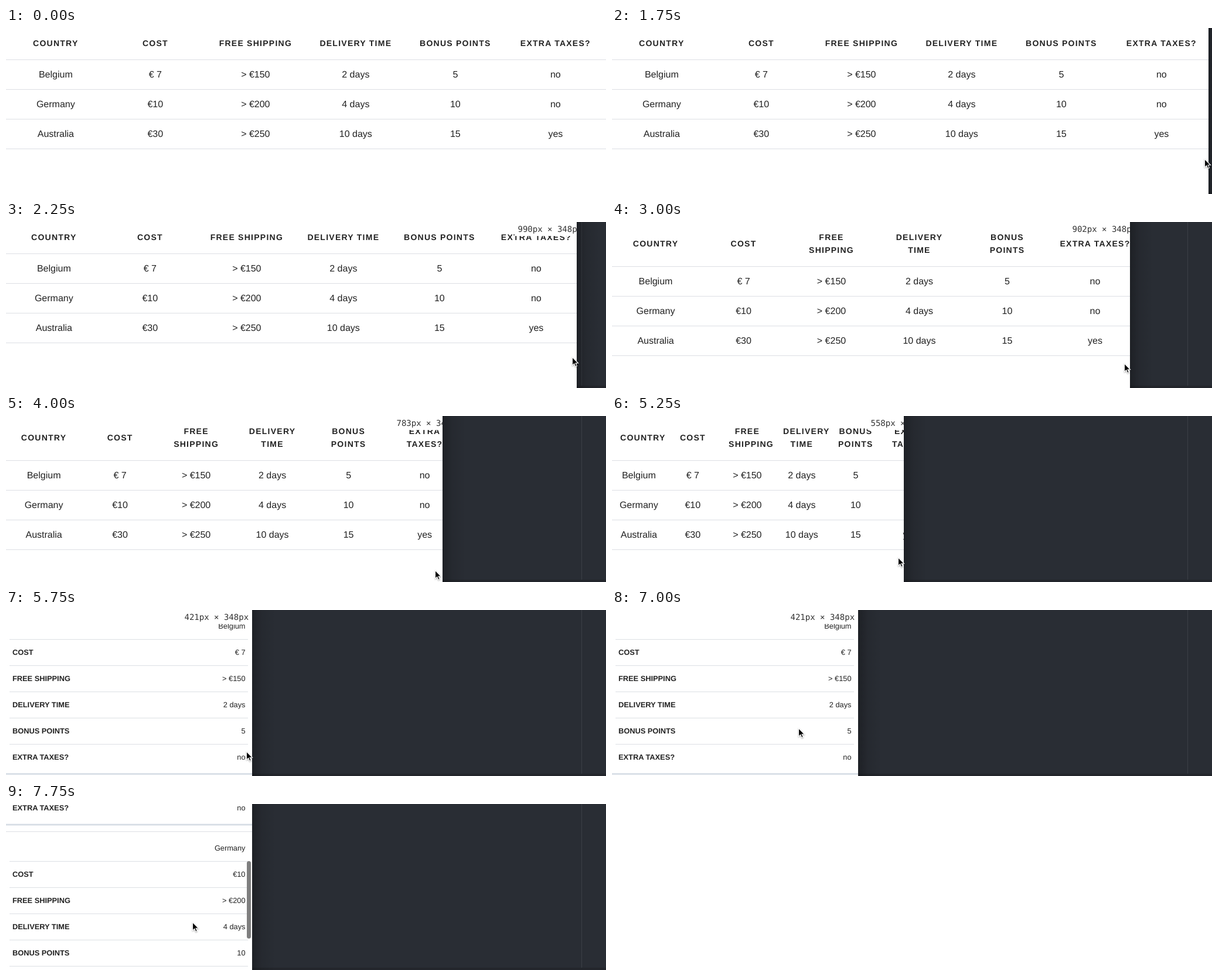
An HTML page that plays this animation: 1024x285 px, repeating every 8000 ms.

```html
<!DOCTYPE html>
<html lang="en">
<head>
<meta charset="utf-8">
<title>Responsive table</title>
<style>
  html, body { margin: 0; width: 100%; height: 100%; overflow: hidden; background: #fff; }
  svg { display: block; }
  text {
    font: 16px "Liberation Sans", Arial, sans-serif; fill: #222;
    white-space: pre; text-rendering: geometricPrecision;
  }
  .head { font-size: 14px; font-weight: bold; letter-spacing: 1.25px; }
  .card { font-size: 12.8px; }
  .label { font-weight: bold; }
  .end { text-anchor: end; }
  .mid { text-anchor: middle; }
  .size { font: 14px "DejaVu Sans Mono", monospace; fill: #333; }
  .arrow { stroke: #fff; stroke-width: 1.1; filter: drop-shadow(0 1px 1px rgba(0, 0, 0, .35)); }
</style>
</head>
<body>
<svg width="1024" height="285" viewBox="0 0 1024 285">
  <defs>
    <linearGradient id="shade">
      <stop offset="0" stop-color="#000" stop-opacity=".28"/>
      <stop offset=".4" stop-color="#000" stop-opacity=".09"/>
      <stop offset="1" stop-color="#000" stop-opacity="0"/>
    </linearGradient>
  </defs>
  <g id="stage"></g>
</svg>
<script>
const LOOP = 8000, STEP = 250, LINE = '#dcdfe4', PAD = 14.6;

const heads = ['COUNTRY', 'COST', 'FREE SHIPPING', 'DELIVERY TIME', 'BONUS POINTS', 'EXTRA TAXES?'];
const rows = [
  ['Belgium', '€ 7', '> €150', '2 days', '5', 'no'],
  ['Germany', '€10', '> €200', '4 days', '10', 'no'],
  ['Australia', '€30', '> €250', '10 days', '15', 'yes']
];

// Key poses: ms, page width, visible edge, pointer's distance left of the edge, pointer y.
const poses = [
  [250, 1026, 1024, -3, 226],
  [1000, 1026, 1024, 6, 226],
  [1500, 1026, 1024, 6, 226],
  [1750, 1026, 1018, 7, 225],
  [2750, 953, 930, 9, 239],
  [3000, 902, 884, 10, 243],
  [4000, 783, 745, 13, 265],
  [5250, 558, 498, 10, 243],
  [5750, 421, 420, 10, 243],
  [6250, 421, 420, 10, 243],
  [7000, 421, 420, 102, 203]
];

const clamp = p => Math.min(1, Math.max(0, p));
const smooth = p => p * p * (3 - 2 * p);

function poseAt(t) {
  const next = poses.findIndex(p => p[0] > t);
  if (next < 0) return poses[poses.length - 1];
  const b = poses[next], a = poses[Math.max(0, next - 1)];
  const p = clamp((t - a[0]) / (b[0] - a[0] || 1));
  return a.map((v, i) => Math.round(v + (b[i] - v) * p));
}

const rect = (x, y, w, h, fill, more = '') =>
  `<rect x="${x}" y="${y}" width="${w}" height="${h}" fill="${fill}" ${more}/>`;
const text = (x, y, cls, s) =>
  `<text x="${x}" y="${y}" class="${cls}">${s.replace('>', '&gt;')}</text>`;

const pen = document.createElement('canvas').getContext('2d');
pen.font = 'bold 14px "Liberation Sans", Arial, sans-serif';
pen.textRendering = 'geometricPrecision';
const headWidth = s => pen.measureText(s).width + s.length * 1.25;

function table(page) {
  const col = (page - 2) / 6;
  const left = i => Math.floor(i * col) - 0.5;
  const titles = heads.map(s => headWidth(s) > col - 2 * PAD ? s.split(' ') : [s]);
  const extra = titles.some(lines => lines.length > 1) ? 22 : 0;
  let out = '';
  titles.forEach((lines, i) => {
    const top = 31 + (extra && lines.length < 2 ? 11 : 0);
    lines.forEach((s, n) => {
      const x = left(i) + Math.max((col - headWidth(s)) / 2, PAD);
      out += text(x, top + n * 22, 'head', s);
    });
  });
  out += rect(0, 54 + extra, page, 1, LINE);
  rows.forEach((row, r) => {
    const y = 85 + extra + r * 51;
    row.forEach((s, i) => { out += text(left(i) + col / 2, y, 'mid', s); });
    out += rect(0, y + 20, page, 1, LINE);
  });
  return out;
}

function cards(page, scroll) {
  const right = page - 12.5;
  let out = '';
  rows.forEach((row, r) => {
    const y = 50 + r * 294 - scroll;
    out += rect(0, y - 51, page, 1, LINE);
    out += text(right, y - 18, 'card end', row[0]);
    for (let i = 1; i < heads.length; i++) {
      const top = y + (i - 1) * 45;
      out += rect(6, top, page - 14, 1, LINE);
      out += text(11, top + 27, 'card label', heads[i]);
      out += text(right, top + 27, 'card end', row[i]);
    }
    out += rect(0, y + 230, page, 3, '#dae0e7');
  });
  return out;
}

function backdrop(edge) {
  const w = 1024 - edge;
  return rect(edge, 0, w, 285, '#292d34')
    + (edge < 982 ? rect(982, 0, 1, 281, '#3b3f46') : '')
    + rect(edge, 281, w, 4, '#23262c')
    + rect(edge, 0, 40, 285, 'url(#shade)');
}

function draw(t) {
  const [, page, edge, grip, y] = poseAt(t);
  const scroll = Math.round(246 * smooth(clamp((t - 7000) / 750)));
  let out = rect(0, 0, 1024, 285, '#fff');
  out += page < 500 ? cards(page, scroll) : table(page);
  if (t >= 2000 && !scroll) {
    out += rect(page - 122, 0, 122, 24, '#fff');
    out += text(page - 116.5, 16.6, 'size', `${page}px × 348px`);
  }
  if (scroll) out += rect(411, 3 + scroll * 0.386, 7, 133, '#7f7f7f', 'rx="3.5"');
  out += backdrop(edge);
  if (t >= 500) {
    out += `<path class="arrow" transform="translate(${edge - grip + 0.5} ${y})"
      d="M0 0V14.2L3.2 11.2L5.4 16.2L7.8 15.2L5.6 10.3H10Z"/>`;
  }
  document.getElementById('stage').innerHTML = out;
}

const start = performance.now();
let shown = -1;
function tick() {
  const t = Math.max(0, performance.now() - start) % LOOP;
  const step = Math.floor(t / STEP);
  if (step !== shown) draw((shown = step) * STEP);
  requestAnimationFrame(tick);
}
tick();
</script>
</body>
</html>
```
